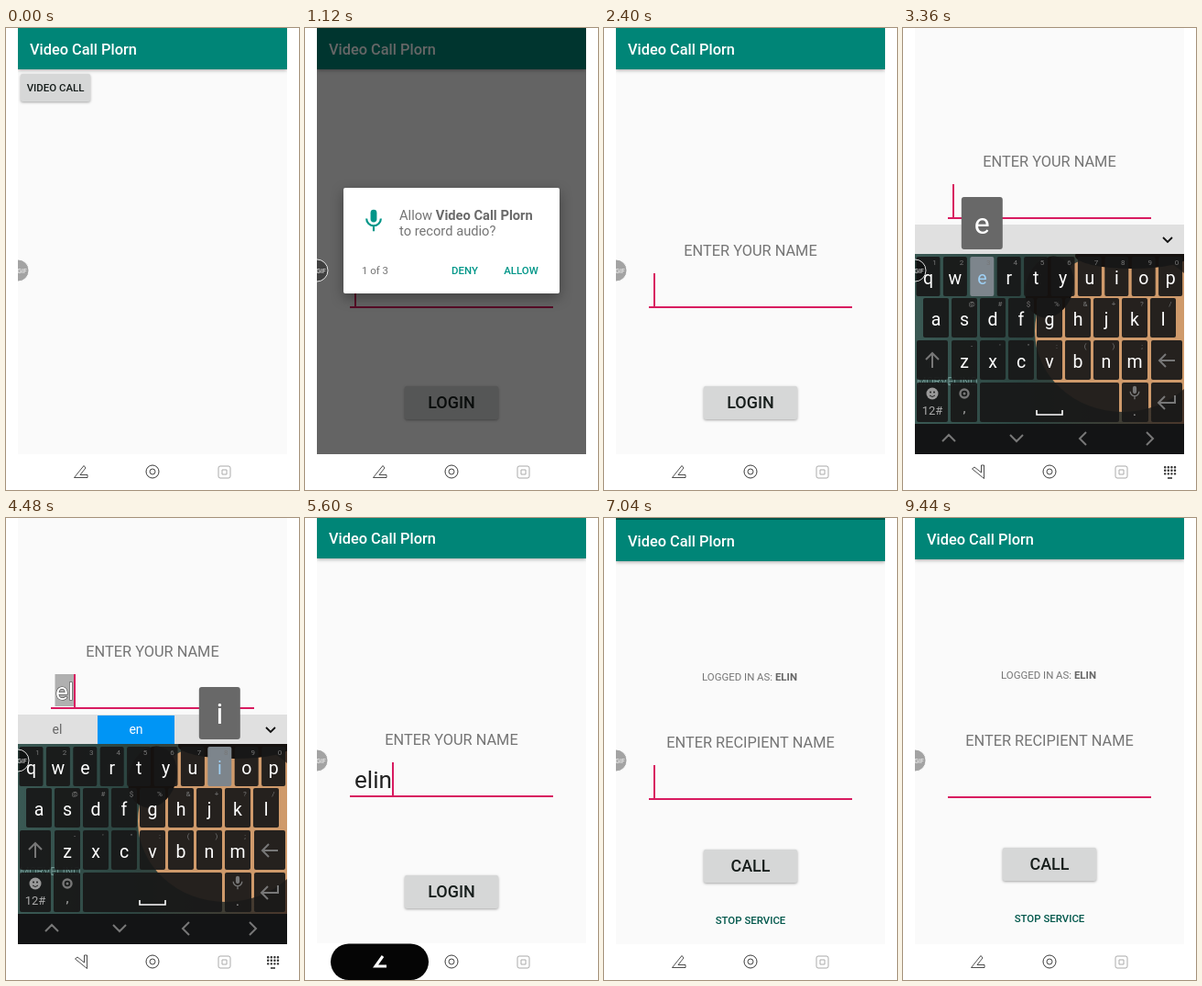
Recreate the animation shown at these times as an HTML page with a canvas. Size 320 by 503 pixels, loop 9.6 s.

```html
<!DOCTYPE html>
<html lang="en">
<head>
<meta charset="utf-8">
<title>Video call demo</title>
<style>
html, body { margin: 0; width: 100%; height: 100%; overflow: hidden; background: #fff; }
canvas { display: block; }
</style>
</head>
<body>
<canvas id="stage" width="320" height="503"></canvas>
<script>
const c = document.getElementById('stage').getContext('2d');
const LOOP = 9600, STEP = 160;
const APP = 'Video Call Plorn', USER = 'elin';
const TEAL = '#008577', PINK = '#d81b60', GREY = '#757575';

const clamp = v => Math.max(0, Math.min(1, v));
const progress = (t, start, length) => clamp((t - start) / length);
const easeOut = u => 1 - (1 - u) ** 3;
const between = (t, a, b) => t >= a && t < b;

function box(x, y, w, h, fill, r = 0, shadow = 0) {
  c.save();
  if (shadow) {
    c.shadowColor = 'rgba(0,0,0,.35)';
    c.shadowBlur = shadow;
    c.shadowOffsetY = shadow / 3;
  }
  c.fillStyle = fill;
  c.beginPath();
  c.roundRect(x, y, w, h, r);
  c.fill();
  c.restore();
}

function font(size, weight = 400) {
  c.font = `${weight} ${size}px Roboto, sans-serif`;
}

function text(s, x, y, size, color, weight = 400, align = 'center') {
  font(size, weight);
  c.fillStyle = color;
  c.textAlign = align;
  c.fillText(s, x, y);
  return c.measureText(s).width;
}

function line(d, color, width = 1) {
  c.strokeStyle = color;
  c.lineWidth = width;
  c.stroke(new Path2D(d));
}

function disc(x, y, r, fill, stroke, width = 1) {
  c.beginPath();
  c.arc(x, y, r, 0, 7);
  if (fill) { c.fillStyle = fill; c.fill(); }
  if (stroke) { c.strokeStyle = stroke; c.lineWidth = width; c.stroke(); }
}

function oval(x, y, rx, ry, tilt, fill) {
  c.fillStyle = fill;
  c.beginPath();
  c.ellipse(x, y, rx, ry, tilt, 0, 7);
  c.fill();
}

function button(label, x, y, w, h, size, pressed) {
  box(x, y, w, h, pressed ? '#bfc0c0' : '#d6d7d7', 2, 3);
  text(label, x + w / 2, y + h / 2 + size * .36, size, '#161d1b', 500);
}

// Page pieces

function frame() {
  box(13, 0, 294, 464, '#fafafa');
  box(13, 0, 294, 45, TEAL, 0, 4);
  text(APP, 26, 29, 16.33, '#fff', 500, 'left');
}

function startPage(t) {
  frame();
  button('VIDEO CALL', 16, 50, 76, 30, 11.43, between(t, 480, 960));
}

function field(title) {
  text(title, 160, 248, 16.33, GREY);
  box(49, 303, 222, 2, PINK);
}

function caret(x) {
  box(Math.round(x), 267, 2, 36, PINK);
}

function typedText(t) {
  const keys = [3520, 4000, 4640, 4800];
  return USER.slice(0, keys.filter(k => t >= k).length);
}

function loginPage(t) {
  frame();
  field('ENTER YOUR NAME');
  const typed = typedText(t);
  font(26.13);
  const w = c.measureText(typed).width;
  if (typed && t < 4960) {
    box(53.5, 267, w + 2, 35, '#b0b0b0');
    c.strokeStyle = '#444';
    c.lineWidth = 1.2;
    c.textAlign = 'left';
    c.strokeText(typed, 54, 295);
    text(typed, 54, 295, 26.13, '#fff', 400, 'left');
  } else {
    text(typed, 54, 295, 26.13, '#212121', 400, 'left');
  }
  if (!between(t, 6080, 6560)) caret(54 + w);
  button('LOGIN', 109, 390, 102, 36, 17.97, between(t, 6560, 7040));
}

function callPage(t) {
  frame();
  const intro = 'LOGGED IN AS: ', name = USER.toUpperCase();
  const w = text(intro, 107, 175, 11.43, GREY, 400, 'left');
  text(name, 107 + w, 175, 11.43, '#666', 700, 'left');
  field('ENTER RECIPIENT NAME');
  const hidden = between(t, 7360, 7840) || between(t, 8480, 8960) || t >= 9440;
  if (!hidden) caret(54);
  button('CALL', 109, 359, 102, 36, 17.97);
  text('STOP SERVICE', 160, 440, 11.43, '#00574b', 500);
}

function slideIn(oldPage, newPage, t, start, length) {
  const u = progress(t, start, length);
  if (u < 1) {
    oldPage(t);
    box(13, 0, 294, 464, `rgba(0,0,0,${.5 * u})`);
  }
  if (!u) return;
  c.save();
  c.globalAlpha = clamp(u * 2);
  c.translate(0, Math.round(50 * (1 - easeOut(u))));
  newPage(t);
  c.restore();
}

// Permission dialog

function mic(x, y, s, color) {
  c.save();
  c.translate(x, y);
  c.scale(s, s);
  box(-3.5, -12, 7, 14, color, 3.5);
  line('M-8 -2A8 8 0 0 0 8 -2M0 6V12', color, 2.2);
  c.restore();
}

const requests = [
  ['to record audio?'],
  ['to take pictures and', 'record video?'],
  ['to make and manage', 'phone calls?']
];

function dialog(t) {
  const alpha = progress(t, 800, 320) * (1 - progress(t, 2080, 320));
  if (!alpha) return;
  const i = t < 1760 ? 0 : t < 2080 ? 1 : 2;
  const lines = requests[i], extra = (lines.length - 1) * 17;
  c.save();
  c.globalAlpha = alpha;
  box(13, 0, 294, 464, 'rgba(0,0,0,.6)');
  c.translate(0, -Math.round(extra / 2));
  box(42, 174, 236, 115 + extra, '#fff', 2, 14);
  mic(75, 209.5, .98, '#009688');
  const w = text('Allow ', 103, 209, 14.7, GREY, 400, 'left');
  text(APP, 103 + w, 209, 14.7, '#6a6a6a', 700, 'left');
  lines.forEach((s, n) => text(s, 103, 226 + n * 17, 14.7, GREY, 400, 'left'));
  c.translate(0, extra);
  if (t === 1600 || t === 1920 || t === 2080) box(210, 249, 52, 29, '#dcefed', 2);
  text(`${i + 1} of 3`, 62, 268, 11.43, GREY, 400, 'left');
  text('DENY', 174.5, 268, 11.43, '#009688', 500);
  text('ALLOW', 236, 268, 11.43, '#009688', 500);
  c.restore();
}

// Keyboard

const rows = [
  { keys: 'qwertyuiop', hints: '1234567890', x: 27.5, gap: 29.4, w: 26, y: 249 },
  { keys: 'asdfghjkl', hints: ' @#$%&+?/', x: 36, gap: 31, w: 28, y: 294 },
  { keys: 'zxcvbnm', hints: '-\'":();', x: 67, gap: 31, w: 28, y: 340 }
];
const KEY = 'rgba(24,24,24,.93)', ICON = '#777';

function pressedKey(t) {
  if (between(t, 3360, 3520)) return USER[0];
  if (between(t, 3840, 4000)) return USER[1];
  if (between(t, 4320, 4640)) return USER[2];
  return between(t, 4640, 4800) ? USER[3] : '';
}

function backdrop() {
  const g = c.createLinearGradient(13, 0, 307, 0);
  g.addColorStop(0, '#3a5954');
  g.addColorStop(.4, '#2c4541');
  g.addColorStop(1, '#4a372b');
  c.save();
  box(13, 246, 294, 218, g);
  c.beginPath();
  c.rect(13, 246, 294, 218);
  c.clip();
  oval(240, 330, 96, 88, 0, '#cf9a6b');
  oval(160, 282, 26, 34, .3, '#15110f');
  oval(250, 248, 62, 14, 0, '#15110f');
  text('MORVELINO', 15, 389, 12, '#8db5b2', 300, 'left');
  c.restore();
}

function keyboard(t) {
  box(13, 214, 294, 32, '#e0e0e0');
  const typed = typedText(t), pressed = pressedKey(t);
  if (typed) {
    box(100, 215, 84, 31, '#0095f5');
    text(typed, 56, 235, 14, '#666');
    text(typed.length > 2 ? USER : 'en', 142, 235, 14, '#fff');
  }
  line('M284 228L289 233L294 228', '#111', 1.8);
  backdrop();

  let popup;
  for (const { keys, hints, x, gap, w, y } of rows) {
    [...keys].forEach((k, i) => {
      const cx = x + i * gap, down = k === pressed;
      box(cx - w / 2, y, w, 43, down ? '#7d858c' : KEY, 2);
      text(k, cx, y + 30, 19.5, down ? '#9ed0f4' : '#fff');
      text(hints[i], cx + w / 2 - 6, y + 9, 8, '#777');
      if (down) popup = [Math.min(cx - 22.5, 260), y - 65, k];
    });
  }

  for (const [x, y, w] of [[15, 340, 34], [271, 340, 34], [15, 386, 34],
    [52, 386, 29], [84, 386, 152], [239, 386, 29], [271, 386, 34]])
    box(x, y, w, 43, KEY, 2);
  line('M32 370V355M25 361L32 354L39 361', ICON, 2);
  line('M297 362H280M287 355L280 362L287 369', ICON, 2);
  line('M297 400V408H279M286 401L279 408L286 415', ICON, 2);
  line('M146 416V421H174V416', '#fff', 1.6);
  disc(32, 398, 6.5, '#999');
  disc(30, 396.5, 1, '#222');
  disc(34, 396.5, 1, '#222');
  line('M29 400Q32 403 35 400', '#222');
  text('12#', 32, 421, 13, '#aaa');
  disc(67, 398, 4.5, null, ICON, 2.4);
  disc(67, 398, 1.5, ICON);
  text(',', 67, 419, 15, '#aaa');
  mic(253, 397, .6, ICON);
  text('.', 253, 422, 15, '#aaa');

  box(13, 431, 294, 33, '#131415');
  line('M43 450L50 443L57 450M117 443L124 450L131 443M200 440L193 447L200 454M266 440L273 447L266 454', ICON, 2);

  if (popup) {
    const [x, y, k] = popup;
    box(x, y, 45, 57, '#686868', 3);
    text(k, x + 22.5, y + 40, 32, '#fff');
  }
}

function bubble() {
  disc(13, 264, 12, 'rgba(0,0,0,.35)', 'rgba(255,255,255,.85)');
  text('GIF', 17.5, 266.5, 7, '#fff');
}

function navBar(t, keysOpen) {
  const pressed = between(t, 4960, 5760);
  box(0, 464, 320, 39, '#fff');
  if (pressed) box(28, 463.5, 107, 39.5, '#050505', 20);
  c.save();
  c.translate(82, 483);
  if (keysOpen) c.rotate(-Math.PI / 2);
  if (pressed) line('M3 -6L-5 5H7', '#fff', 3);
  else line('M3 -6.5L-7.5 6.5H7V3.5H-1L5 -4Z', '#222', .8);
  c.restore();
  disc(160, 483, 7, null, '#222', .9);
  disc(160, 483, 3, null, '#333', .9);
  line('M234 477H243Q245 477 245 479V488Q245 490 243 490H234Q232 490 232 488V479Q232 477 234 477Z', '#aaa');
  line('M236 481H241V486H236Z', '#aaa');
  if (keysOpen) {
    for (let i = 0; i < 12; i++)
      box(285 + i % 4 * 3.6, 477 + (i >> 2) * 3.6, 2.4, 2.4, '#333', 1);
    line('M289 490H294', '#333', 1.6);
  }
}

function draw(t) {
  c.clearRect(0, 0, 320, 503);
  const rise = easeOut(progress(t, 2560, 640));
  const fall = easeOut(progress(t, 4960, 800));
  const open = rise - fall;

  c.save();
  c.beginPath();
  c.rect(13, 0, 294, 464);
  c.clip();
  if (t < 2560) {
    slideIn(startPage, loginPage, t, 480, 480);
    dialog(t);
  } else if (t < 6560) {
    c.save();
    c.translate(0, -Math.round(97 * open));
    loginPage(t);
    c.restore();
    if (open > .03) {
      c.save();
      c.translate(0, Math.round(260 * (1 - open)));
      keyboard(t);
      c.restore();
    }
  } else {
    slideIn(loginPage, callPage, t, 6720, 480);
  }
  bubble();
  c.restore();
  navBar(t, open > .4);
}

function tick() {
  const t = performance.now() % LOOP;
  draw(Math.floor(t / STEP) * STEP);
  requestAnimationFrame(tick);
}
tick();
</script>
</body>
</html>
```
